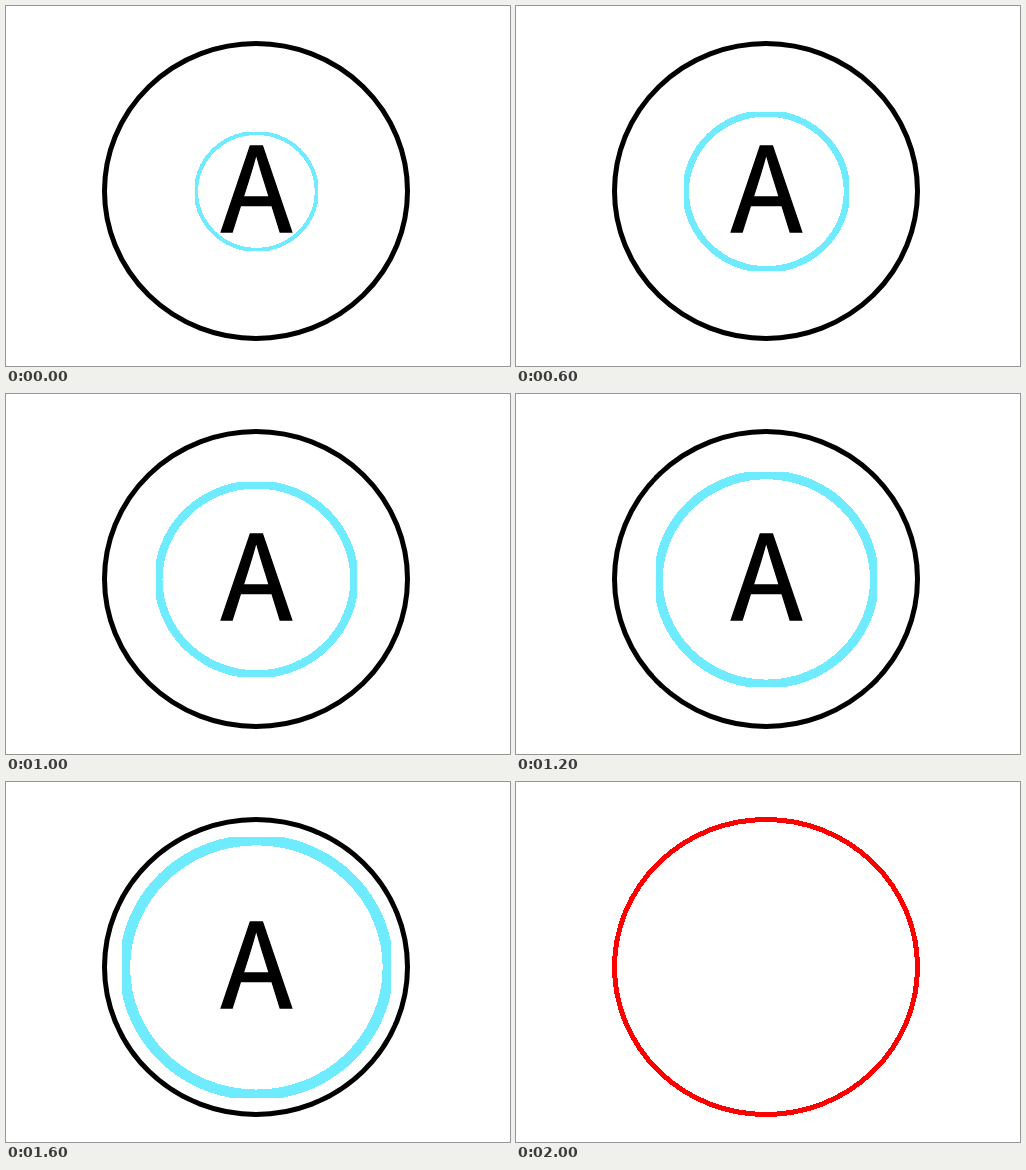
Animation, 504 px wide and 360 px high, one loop 2500 ms. Source, as an HTML page:

```html
<!DOCTYPE html>
<html lang="en">
<head>
<meta charset="utf-8">
<title>Closing ring</title>
<style>
  html, body { margin: 0; width: 100%; height: 100%; overflow: hidden; background: #fff; }
  svg { display: block; width: 504px; height: 360px; }
  #rim { fill: none; stroke-width: 5; animation: rim 2.5s step-end infinite; }
  #pulse { fill: #6febff; fill-rule: evenodd; shape-rendering: crispEdges; }
  text {
    font: 117.5px "Noto Sans CJK JP", "Noto Sans CJK SC", "Noto Sans Mono", sans-serif;
    text-anchor: middle; stroke: #000; stroke-width: 1.4;
    animation: letter 2.5s step-end infinite;
  }
  @keyframes rim {
    0% { stroke: #000; shape-rendering: auto; }
    80%, 100% { stroke: #f00; shape-rendering: crispEdges; }
  }
  @keyframes letter { 0% { visibility: visible; } 80%, 100% { visibility: hidden; } }
</style>
</head>
<body>
<svg viewBox="0 0 504 360">
  <ellipse id="rim" cx="250" cy="185" rx="151.5" ry="147.5"/>
  <path id="pulse"/>
  <text x="250.5" y="226.4">A</text>
</svg>
<script>
  const pulse = document.getElementById('pulse');
  const LOOP = 2500, STEP = 100, LAST = 19;
  const CX = 250.4, CY = 185.4;
  const BULGE = 1.018, FLAT = Math.sqrt(BULGE ** 2 - 1);

  function oval(rx, ry) {
    return `M${CX - rx} ${CY}a${rx} ${ry} 0 1 1 ${2 * rx} 0a${rx} ${ry} 0 1 1 ${-2 * rx} 0z`;
  }

  // Slightly larger oval, cut flat on its four sides
  function flatOval(rx, ry) {
    const fx = rx * FLAT, fy = ry * FLAT;
    const arc = (x, y) => `A${rx * BULGE} ${ry * BULGE} 0 0 1 ${CX + x} ${CY + y}`;
    return `M${CX - fx} ${CY - ry}H${CX + fx}` + arc(rx, -fy) +
      `V${CY + fy}` + arc(fx, ry) +
      `H${CX - fx}` + arc(-rx, fy) +
      `V${CY - fy}` + arc(-fx, -ry) + 'z';
  }

  function draw(time) {
    const n = Math.floor((time % LOOP) / STEP);
    pulse.style.display = n > LAST ? 'none' : '';
    if (n > LAST) return;
    const width = 3.1 + 0.33 * n;
    const scale = 1.0503 ** n;
    const rx = Math.min(61.4 * scale, 154);
    const ry = Math.min(59.5 * scale, 150);
    pulse.setAttribute('d', flatOval(rx, ry) + oval(rx - width, ry - width));
  }

  const start = performance.now();
  function tick() {
    draw(performance.now() - start);
    requestAnimationFrame(tick);
  }
  tick();
</script>
</body>
</html>
```
